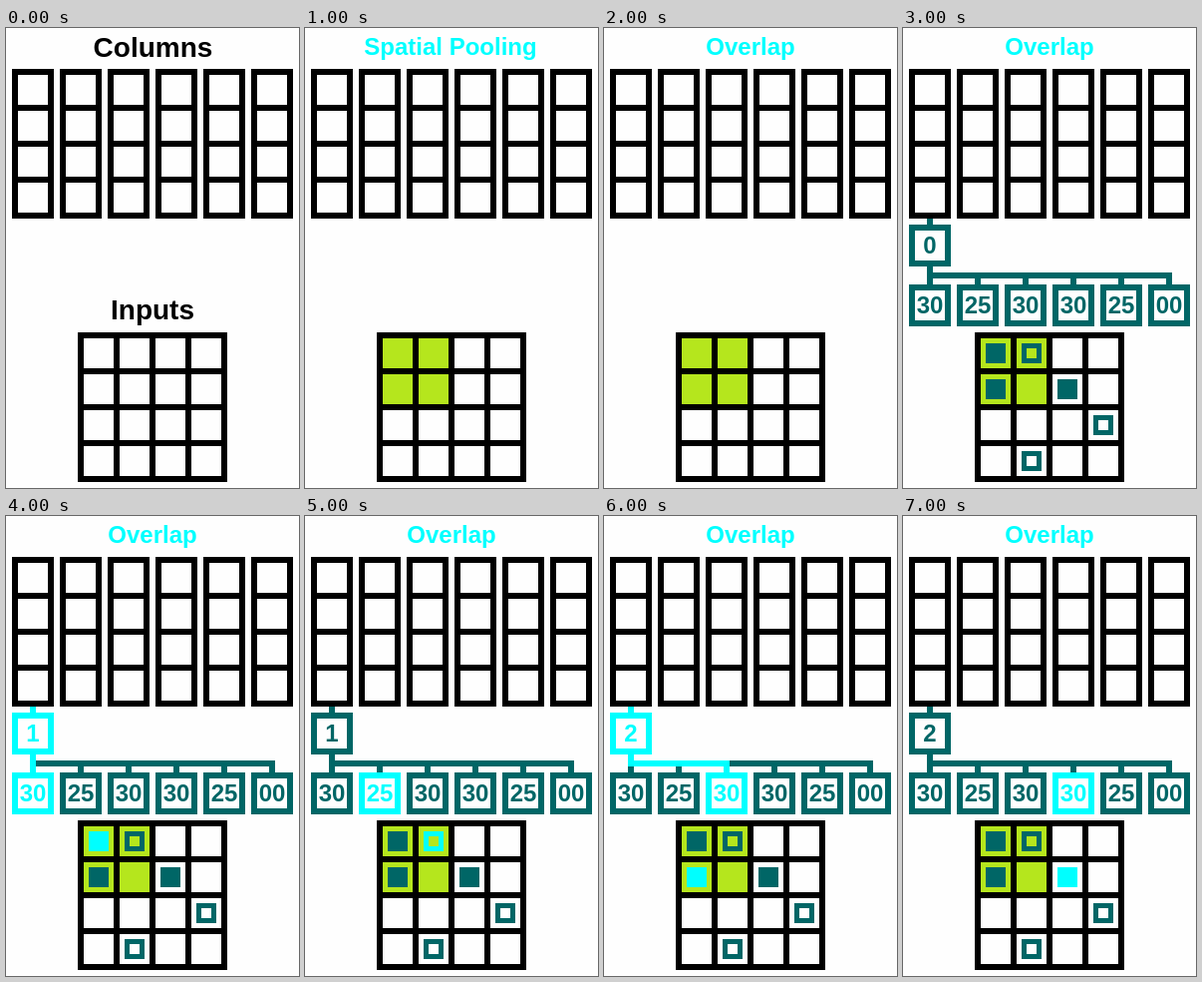
These frames come from a looping animation (294 by 461 pixels, 8000 ms). An HTML page:

```html
<!DOCTYPE html>
<html>
<head>
<meta charset="utf-8">
<style>
  html, body { margin: 0; width: 100%; height: 100%; overflow: hidden; background: #fefefe; }
  svg { display: block; }
  text { font-family: "Liberation Sans", Arial, sans-serif; font-weight: bold; text-anchor: middle; }
</style>
</head>
<body>
<svg id="stage" width="294" height="461" viewBox="0 0 294 461"></svg>
<script>
const STEP = 1000, STEPS = 8;
const BLACK = '#000', CYAN = '#0ff', TEAL = '#066', LIME = '#b5e61d';

// One synapse per column slot: permanence label and the input cell it reads.
const synapses = [
  { value: '30', col: 0, row: 0 },
  { value: '25', col: 1, row: 0 },
  { value: '30', col: 0, row: 1 },
  { value: '30', col: 2, row: 1 },
  { value: '25', col: 3, row: 2 },
  { value: '00', col: 1, row: 3 }
];
const connected = s => s.value >= '30';
const active = s => s.col < 2 && s.row < 2;
const counts = s => connected(s) && active(s);

const rect = (x, y, w, h, fill) =>
  `<rect x="${x}" y="${y}" width="${w}" height="${h}" fill="${fill}"/>`;
const frame = (x, y, size, border, color) => {
  const inset = border / 2, side = size - border;
  return `<rect x="${x + inset}" y="${y + inset}" width="${side}" height="${side}" fill="none" stroke="${color}" stroke-width="${border}"/>`;
};
const label = (text, x, y, size, color) =>
  `<text x="${x}" y="${y}" font-size="${size}" fill="${color}">${text}</text>`;

function grid(x, y, cols, rows) {
  let out = '';
  for (let c = 0; c < cols; c++)
    for (let r = 0; r < rows; r++) out += frame(x + 36 * c, y + 36 * r, 42, 6, BLACK);
  return out;
}

const numberBox = (x, y, text, color) =>
  frame(x, y, 42, 6, color) + label(text, x + 21, y + 29, 24, color);

function marker(s, color) {
  const x = 83 + 36 * s.col, y = 316 + 36 * s.row;
  return connected(s) ? rect(x, y, 20, 20, color) : frame(x, y, 20, 5, color);
}

function network(current) {
  const hit = current >= 0 && counts(synapses[current]);
  const overlap = synapses.slice(0, current + 1).filter(counts).length;
  const root = hit ? CYAN : TEAL;
  let out = rect(24, 191, 6, 6, root) + numberBox(6, 197, overlap, root);
  out += rect(24, 239, 6, 6, root) + rect(24, 245, 246, 6, TEAL);
  synapses.forEach((s, i) => {
    const color = i === current ? CYAN : TEAL;
    out += rect(24 + 48 * i, 251, 6, 6, hit ? color : TEAL);
    out += numberBox(6 + 48 * i, 257, s.value, color) + marker(s, color);
  });
  if (hit) out += rect(24, 245, 48 * current + 6, 6, CYAN);
  return out;
}

function scene(step) {
  let out = step ? rect(78, 311, 66, 66, LIME) : '';
  for (let i = 0; i < 6; i++) out += grid(6 + 48 * i, 41, 1, 4);
  out += grid(72, 305, 4, 4);
  if (step === 0) out += label('Columns', 147.5, 29, 28, BLACK) + label('Inputs', 147, 292, 28, BLACK);
  else if (step === 1) out += label('Spatial Pooling', 146, 27, 24, CYAN);
  else out += label('Overlap', 147, 27, 24, CYAN);
  if (step >= 3) out += network(step - 4);
  return out;
}

const stage = document.getElementById('stage');
const start = performance.now();
let shown = -1;
function tick() {
  const step = Math.floor((performance.now() - start) / STEP) % STEPS;
  if (step !== shown) stage.innerHTML = scene(shown = step);
  requestAnimationFrame(tick);
}
tick();
</script>
</body>
</html>
```
